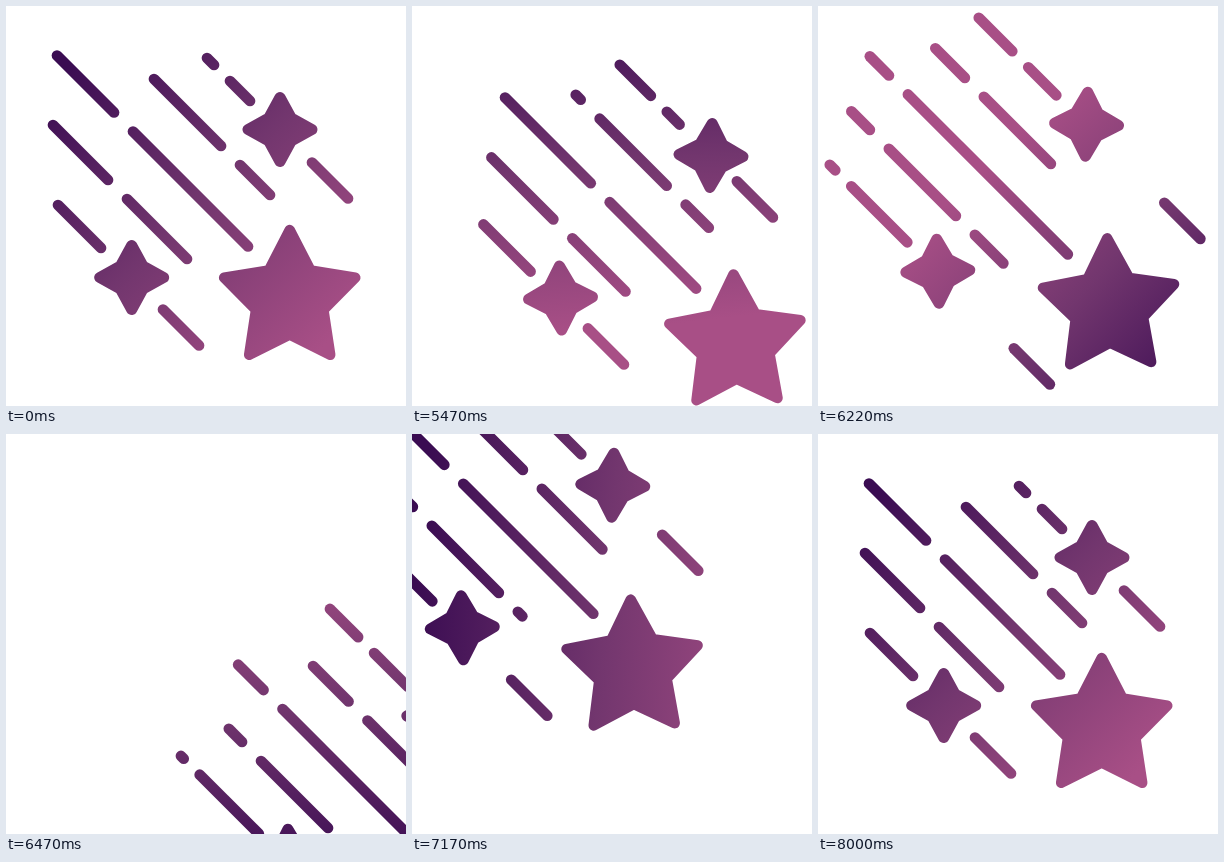
Recreate the animation shown at these times as an HTML page with a canvas. Size 400x400 px, loop 8020 ms.

```html
<!DOCTYPE html>
<html>
<head>
<meta charset="utf-8">
<style>
  html, body { margin: 0; width: 100%; height: 100%; overflow: hidden; background: #fff; }
  canvas { display: block; }
</style>
</head>
<body>
<canvas id="stage" width="400" height="400"></canvas>
<script>
const ctx = document.getElementById('stage').getContext('2d');
const LOOP = 8020, REST = 5020, END = 2980, WRAP = 1630;

// Times at which the curves have keys
const OUT = [0, 400, 800, 1200, 1620];
const BACK = [1640, 1850, 2150, 2520, END];
const POSES = [0, 800, 1200, 1850, 2150, END];

// Diagonal travel: out to the lower right, then back in from the upper left
const travel = {
  big: [[0, 45, -13, 7.5, 260], [-290, -149.5, -61, 26, 0]],
  small: [[0, 25, -6, -6, 230], [-300, -185, -75, 17, 0]],
  midRight: [[0, 35, -11, -14, 260], [-300, -205, -74, 23, 0]],
  midLeft: [[0, 35, -13, 4, 260], [-300, -180, -71, 23, 0]],
  shortRight: [[0, 20, -1, 40, 280], [-280, -130, -56, 21, 0]],
  shortLeft: [[0, 20, -0.5, 38.5, 280], [-285, -137, -58, 21, 0]]
};
const midFlow = [0, 16.5, 31.5, 46, 55.5, 86];
const outerLength = [43, 76.5, 77.5, 77, 70, 43];

// Dashed trails: c = x - y, end = x of the leading end, flow = dash phase from that end
const trails = [
  { c: 149, end: 244, move: 'small', period: 80, gap: 16, base: 0,
    flow: [-20, -9, -28, -40, -45, -20], length: outerLength },
  { c: 75, end: 264, move: 'midRight', period: 86, gap: 19, base: -30, flow: midFlow, length: 133 },
  { c: 1.5, end: 242, move: 'big', period: 179, gap: 19, base: -115,
    flow: [0, 69, 134, 150, 164, 179], length: 191, stretch: 7 },
  { c: -72, end: 181, move: 'midLeft', period: 86, gap: 19, base: -60,
    flow: midFlow, length: 134, stretch: 18 },
  { c: -147, end: 95, move: 'small', period: 90, gap: 16, base: 0,
    flow: [-62, -36, -56, -60, -62, -62], length: outerLength }
];

// Smooth curve through keys, at rest at both ends
function curve(times, values, t) {
  const last = times.length - 1;
  if (t <= times[0]) return values[0];
  if (t >= times[last]) return values[last];
  let i = 0;
  while (t > times[i + 1]) i++;
  const slope = k => k === 0 || k === last ? 0
    : (values[k + 1] - values[k - 1]) / (times[k + 1] - times[k - 1]);
  const h = times[i + 1] - times[i], s = (t - times[i]) / h;
  const ease = s * s * (3 - 2 * s);
  return values[i] + (values[i + 1] - values[i]) * ease
    + h * s * (1 - s) * (slope(i) * (1 - s) - slope(i + 1) * s);
}

function shift(name, t) {
  const [out, back] = travel[name];
  return t < WRAP ? curve(OUT, out, t) : curve(BACK, back, t);
}

function line(x0, x1, c) {
  ctx.beginPath();
  ctx.moveTo(x0, x0 - c);
  ctx.lineTo(x1 + 0.01, x1 - c + 0.01);
  ctx.stroke();
}

function drawTrail(trail, t) {
  const { c, period, gap, base, flow, length, stretch = 0 } = trail;
  const end = trail.end + shift(trail.move, t);
  const pull = Math.max(0, 1 - Math.abs(t - 1200) / 400);
  const size = (length === outerLength ? curve(POSES, length, t) : length) + stretch * pull;
  const phase = base + curve(POSES, flow, t);
  for (let k = -4; k < 3; k++) {
    const from = Math.max(-size, phase + k * period);
    const to = Math.min(0, phase + (k + 1) * period - gap);
    if (to >= from) line(end + from, end + to, c);
  }
}

// Outline of a star with rounded tips, centred on the origin
function starPath(points, outer, inner) {
  const path = new Path2D();
  for (let i = 0; i < points * 2; i++) {
    const a = i * Math.PI / points, r = i % 2 ? inner : outer;
    path.lineTo(r * Math.sin(a), -r * Math.cos(a));
  }
  path.closePath();
  return path;
}
const bigStar = starPath(5, 69, 35.5), smallStar = starPath(4, 32, 16);

// The colour axis turns once while its middle drifts towards the dark end
function gradient(t) {
  const a = curve(POSES, [45, 140, 225, 320, 365, 405], t) * Math.PI / 180;
  const drift = curve(POSES, [8, 80, 108, 20, 10, 8], t);
  const half = curve(POSES, [190, 140, 160, 185, 190, 190], t);
  const at = d => [200 + d * Math.cos(a), 200 + d * Math.sin(a)];
  return [...at(-half - drift), ...at(half - drift)];
}

function paint(ends) {
  const g = ctx.createLinearGradient(...ends);
  g.addColorStop(0, '#3a0c52');
  g.addColorStop(0.5, '#72366e');
  g.addColorStop(1, '#a84f86');
  ctx.fillStyle = ctx.strokeStyle = g;
}

function drawStar(path, x, y, turn, ends, width) {
  ctx.save();
  ctx.translate(x, y);
  ctx.rotate(turn);
  paint(ends.map((v, i) => v - (i % 2 ? y : x)));
  ctx.lineWidth = width;
  ctx.fill(path);
  ctx.stroke(path);
  ctx.restore();
}

function draw(time) {
  const t = Math.max(0, Math.min(END, time - REST));
  const moving = time >= REST && t < END;
  const shake = period => moving
    ? Math.min(1, 2.5 * Math.abs(Math.sin((t + 25) * Math.PI / period))) : 0;
  const turn = shake(125), push = shake(81.6);
  const ends = gradient(t);

  ctx.fillStyle = '#fff';
  ctx.fillRect(0, 0, 400, 400);
  ctx.lineCap = ctx.lineJoin = 'round';
  ctx.lineWidth = 10.7;
  paint(ends);
  for (const trail of trails) drawTrail(trail, t);
  const right = shift('shortRight', t), left = shift('shortLeft', t);
  line(306 + right, 342 + right, 149.5);
  line(157 + left, 193 + left, -146.5);

  const big = shift('big', t), small = shift('small', t);
  drawStar(bigStar, 283.7 + big - 2.3 * push, 293 + big + 2.3 * push, -0.028 * turn, ends, 10.4);
  drawStar(smallStar, 274 + small + 1.5 * push, 123.5 + small + 2.5 * push, 0.035 * turn, ends, 11);
  drawStar(smallStar, 125.7 + small - 0.7 * push, 271.5 + small - 3 * push, -0.035 * turn, ends, 11);
}

const start = performance.now();
function frame() {
  draw((performance.now() - start) % LOOP);
  requestAnimationFrame(frame);
}
frame();
</script>
</body>
</html>
```
